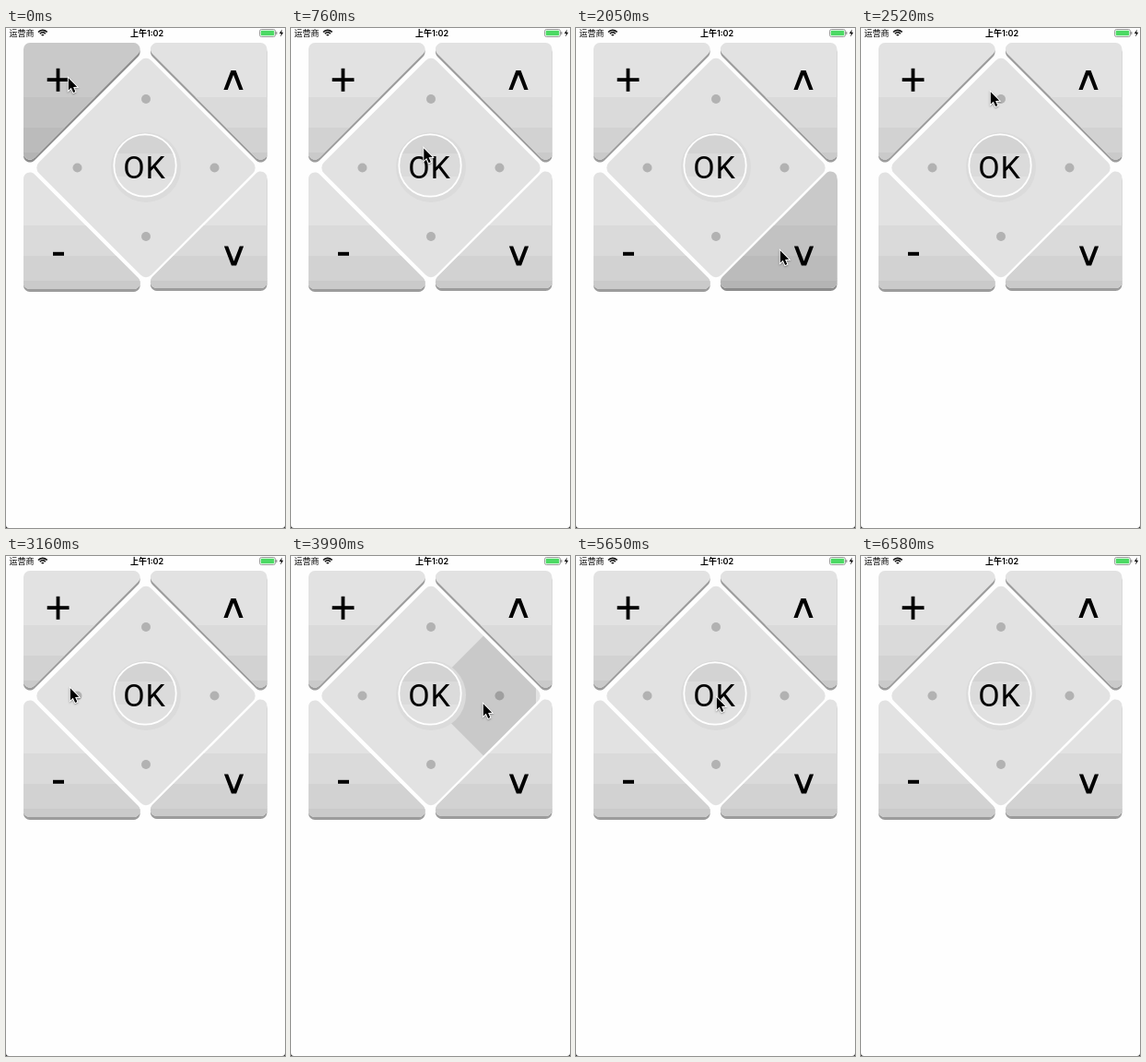
These frames come from a looping animation (303 px wide and 542 px high, 6.62 s). An HTML page with a canvas:

```html
<!DOCTYPE html>
<html lang="zh">
<head>
<meta charset="utf-8">
<title>Remote</title>
<style>
html, body { margin: 0; width: 100%; height: 100%; overflow: hidden; background: #fff; }
canvas { display: block; width: 303px; height: 542px; }
</style>
</head>
<body>
<canvas id="stage"></canvas>
<script>
const W = 303, H = 542, LOOP = 6620, TICK = 57;
const canvas = document.getElementById('stage');
const ratio = window.devicePixelRatio || 1;
canvas.width = W * ratio;
canvas.height = H * ratio;
const ctx = canvas.getContext('2d');
const UI_FONT = 'Inter, "Noto Sans CJK SC", "Noto Sans CJK", sans-serif';
const SHADE = 'rgba(0,0,0,.11)';
const PAD = { x: 152, y: 151.5, half: 122 };

// Where the pointer rests on each key.
const spots = {
  plus: [67, 53], next: [227, 55], minus: [67, 233], prev: [221, 240], up: [140, 68],
  left: [69, 142], right: [208, 159], down: [147, 220], ok: [152, 152], exit: [267, 492]
};

// Each tap: key, press time, time the pointer reaches the following key.
const taps = [
  ['plus', 0, 400], ['next', 640, 1100], ['minus', 1340, 1690], ['prev', 2050, 2520],
  ['up', 2750, 3160], ['left', 3400, 3810], ['right', 3990, 4210], ['down', 4440, 4670],
  ['ok', 5030, 5360], ['ok', 5600, 5820]
];

const easeOut = u => 1 - (1 - u) ** 3.5;
const swingOut = u => easeOut(u) + u * (1 - u) ** 2;

// The screen refreshes in ticks: one for the press, the rest for the move.
function stateAt(t) {
  const i = taps.findLastIndex(tap => tap[1] <= t);
  const [key, from, to] = taps[i];
  const last = Math.round((to - from) / TICK);
  const step = Math.min(last, Math.floor((t - from + 6) / (to - from) * last));
  const u = Math.max(0, step - 1) / (last - 1);
  const [ax, ay] = spots[key];
  const [bx, by] = spots[i + 1 < taps.length ? taps[i + 1][0] : 'exit'];
  const gone = i + 1 === taps.length && step === last;
  return {
    pressed: step === 0 ? key : '',
    pointer: gone ? null : [ax + (bx - ax) * swingOut(u), ay + (by - ay) * easeOut(u)]
  };
}

function polygon(points, r = 0) {
  const n = points.length;
  const [ax, ay] = points[0], [bx, by] = points[n - 1];
  ctx.beginPath();
  ctx.moveTo((ax + bx) / 2, (ay + by) / 2);
  points.forEach((p, i) => ctx.arcTo(...p, ...points[(i + 1) % n], r));
  ctx.closePath();
}

function fill(style) {
  ctx.fillStyle = style;
  ctx.fill();
}

function circle(x, y, r) {
  ctx.beginPath();
  ctx.arc(x, y, r, 0, Math.PI * 2);
}

function bands(list) {
  list.forEach(([y, color]) => {
    ctx.fillStyle = color;
    ctx.fillRect(0, y, W, H - y);
  });
}

function label(text, x, y, font, align = 'center') {
  ctx.fillStyle = '#000';
  ctx.font = font;
  ctx.textAlign = align;
  ctx.fillText(text, x, y);
}

// A triangular key with its right angle at (x, y).
function drawKey(x, y, sx, sy, pressed) {
  const size = 136.5;
  const points = [[x, y], [x + sx * size, y], [x, y + sy * size]];
  ctx.save();
  ctx.translate(0, 3);
  polygon(points, 7);
  fill(pressed ? '#8c8c8c' : '#9c9c9c');
  ctx.translate(0, -3);
  polygon(points, 7);
  ctx.clip();
  const top = sy > 0 ? 75 : 214;
  bands([[0, '#e2e2e2'], [top, '#dadada'], [top + 33, '#d2d2d2'], [top + 60, '#cacaca']]);
  if (pressed) bands([[0, SHADE]]);
  ctx.restore();
}

function chevron(x, y, dir) {
  ctx.beginPath();
  [[-2.6, 0], [2.6, 0], [10.6, 21], [6.3, 21], [0, 4.8], [-6.3, 21], [-10.6, 21]]
    .forEach(([dx, dy]) => ctx.lineTo(x + dx, y + dy * dir));
  fill('#000');
}

function drawKeys(pressed) {
  drawKey(19, 16, 1, 1, pressed === 'plus');
  drawKey(283.5, 16, -1, 1, pressed === 'next');
  drawKey(19, 283, 1, -1, pressed === 'minus');
  drawKey(283.5, 282, -1, -1, pressed === 'prev');
  ctx.fillStyle = '#000';
  ctx.fillRect(44.7, 54.2, 23.8, 3.8);
  ctx.fillRect(54.6, 43.8, 3.8, 25);
  ctx.fillRect(51, 242.8, 12, 4);
  chevron(247, 46, 1);
  chevron(247.5, 257.5, -1);
}

function drawPad(pressed) {
  const { x, y, half } = PAD;
  ctx.save();
  polygon([[x, y - half], [x + half, y], [x, y + half], [x - half, y]], 8);
  fill('#e2e2e2');
  ctx.clip();
  ['right', 'down', 'left', 'up'].forEach((name, i) => {
    const dx = Math.round(Math.cos(i * Math.PI / 2));
    const dy = Math.round(Math.sin(i * Math.PI / 2));
    circle(x + dx * 74.5, y + dy * 74.5, 5);
    fill('#b2b2b2');
    if (name !== pressed) return;
    const ox = x - 8 * Math.abs(dx), oy = y - 8 * Math.abs(dy);
    polygon([[ox, oy], [ox + (dx + dy) * half, oy + (dy - dx) * half],
             [ox + (dx - dy) * half, oy + (dy + dx) * half]]);
    fill(SHADE);
  });
  ctx.restore();
}

function drawOk(down) {
  circle(152, 151, 38);
  fill(down ? '#bcbcbc' : '#dbdbdb');
  ctx.save();
  circle(151, 149, 34);
  ctx.clip();
  bands([[0, '#d3d3d3'], [136, '#dbdbdb'], [161, '#e1e1e1']]);
  if (down) bands([[0, SHADE]]);
  ctx.restore();
  circle(151, 149, 33.7);
  ctx.lineWidth = 1.8;
  ctx.strokeStyle = down ? '#dedede' : '#fff';
  ctx.stroke();
  ctx.letterSpacing = '1px';
  label('OK', 150.5, 163, '34px Roboto, sans-serif');
  ctx.letterSpacing = '0px';
}

function drawStatus() {
  label('运营商', 3.5, 9, '9px ' + UI_FONT, 'left');
  label('上午1:02', 153, 9, '600 9px ' + UI_FONT);

  ctx.strokeStyle = '#111';
  ctx.lineWidth = 1.6;
  [6.6, 4.1, 1.5].forEach(r => {
    ctx.beginPath();
    ctx.arc(39.8, 9, r, -Math.PI * .76, -Math.PI * .24);
    ctx.stroke();
  });

  ctx.beginPath();
  ctx.roundRect(275.5, 1.5, 17, 8, 2);
  ctx.lineWidth = .7;
  ctx.strokeStyle = '#777';
  ctx.stroke();
  ctx.beginPath();
  ctx.roundRect(276.7, 2.7, 14.6, 5.6, 1);
  fill('#4cd964');
  ctx.fillStyle = '#777';
  ctx.fillRect(293.3, 4, 1, 3);
  polygon([[299.8, 1.5], [296.8, 6], [298.8, 6], [298.2, 9.5], [301.2, 4.8], [299.2, 4.8]]);
  fill('#111');
}

function drawCorners() {
  [[0, 1], [W, -1]].forEach(([x, dir]) => {
    ctx.beginPath();
    ctx.moveTo(x, H);
    ctx.lineTo(x, H - 3);
    ctx.quadraticCurveTo(x, H, x + 3 * dir, H);
    fill('#222');
  });
}

function drawPointer([x, y]) {
  ctx.save();
  ctx.translate(x + .8, y + 1.2);
  ctx.scale(.94, .94);
  polygon([[0, 0], [0, 14.2], [3.2, 11.2], [5.7, 16.8], [8, 15.8], [5.6, 10.4], [10, 10.2]]);
  ctx.shadowColor = 'rgba(0,0,0,.35)';
  ctx.shadowBlur = 2 * ratio;
  ctx.shadowOffsetY = ratio;
  ctx.lineWidth = 2;
  ctx.strokeStyle = '#fff';
  ctx.stroke();
  ctx.shadowColor = 'transparent';
  fill('#000');
  ctx.restore();
}

function draw(t) {
  const { pressed, pointer } = stateAt(t);
  ctx.setTransform(ratio, 0, 0, ratio, 0, 0);
  bands([[0, '#fefefe']]);
  drawStatus();
  drawKeys(pressed);
  drawPad(pressed);
  drawOk(pressed === 'ok');
  drawCorners();
  if (pointer) drawPointer(pointer);
}

const start = performance.now();
function tick() {
  draw((performance.now() - start) % LOOP);
  requestAnimationFrame(tick);
}
tick();
</script>
</body>
</html>
```
